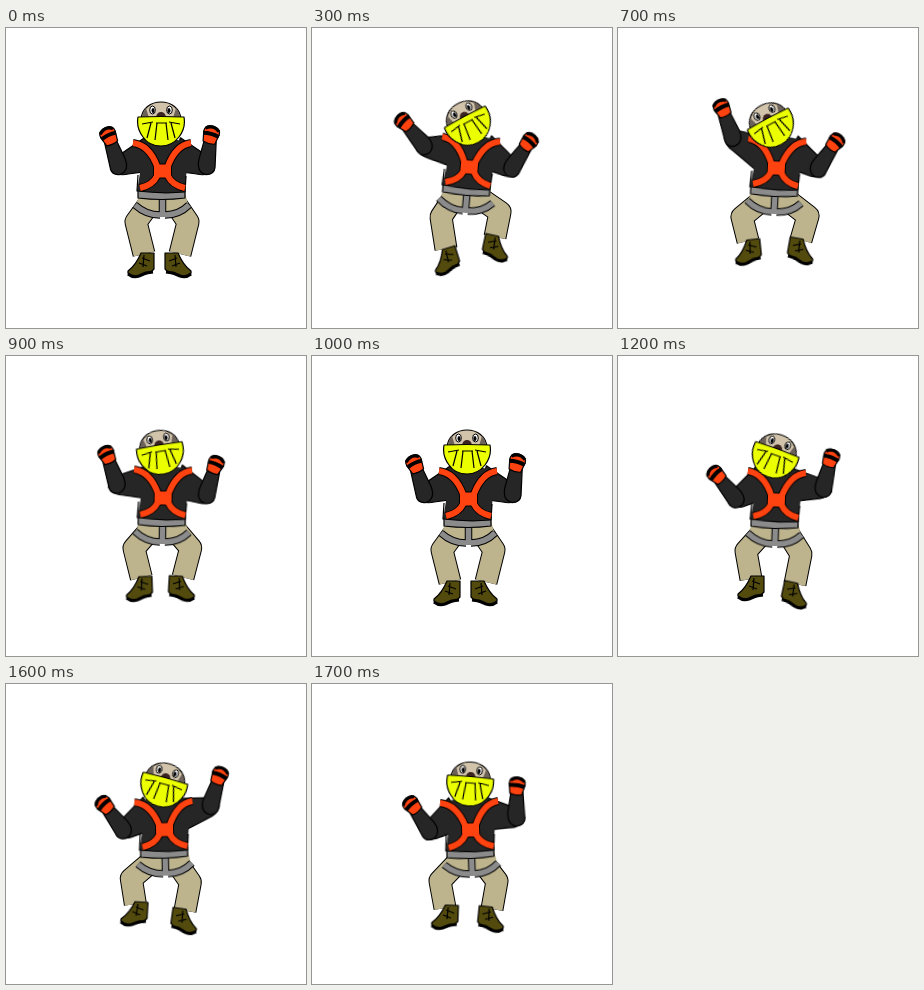
An HTML page without scripts for the animation above (1800 ms loop, 300 by 300 pixels).

```html
<!DOCTYPE html>
<html lang="en">
<head>
<meta charset="utf-8">
<title>Climber</title>
<style>
html, body { margin: 0; width: 100%; height: 100%; overflow: hidden; background: #fff; }
svg { display: block; width: 100vw; height: 100vh; }
path { fill: none; stroke-linejoin: round; }

.line { stroke: #000; stroke-width: 1.2; }
.black { fill: #262626; }
.beige { fill: #bdb48e; }
.orange { fill: #ff4310; }
.grey { fill: #8b8b8b; }

/* Bands: a black stroke under a narrower coloured one */
.trouser { stroke: #bdb48e; stroke-width: 21; }
.trouser.edge { stroke: #000; stroke-width: 23; }
.strap { stroke: #ff4310; stroke-width: 6; }
.strap.edge { stroke: #000; stroke-width: 8; }
.loop { stroke: #8b8b8b; stroke-width: 5.5; }
.loop.edge { stroke: #000; stroke-width: 7.5; }

/* Every pose is held for 100 ms; steps(n) fills n holds up to the next key */
.arm-l, .arm-r, .fore-l, .fore-r, .leg-l, .leg-r, .boot-l, .boot-r, .body, .head {
  animation: 1.8s steps(3) infinite;
}
.arm-l { animation-name: arm-l; }
.arm-r { animation-name: arm-r; }
.fore-l { animation-name: fore-l; }
.fore-r { animation-name: fore-r; }
.leg-l { animation-name: leg-l; }
.leg-r { animation-name: leg-r; }
.boot-l { animation-name: boot-l; }
.boot-r { animation-name: boot-r; }
.body { animation-name: body; transform-origin: 156px 140px; }
.head { animation-name: head; }

@keyframes arm-l {
  0%, 100% { rotate: -25deg; }
  16.66% { rotate: -2deg; animation-timing-function: steps(2); }
  27.77% { rotate: 24deg; animation-timing-function: steps(2); }
  38.88% { rotate: 20deg; }
  55.55% { rotate: -25deg; animation-timing-function: steps(2); }
  66.66% { rotate: -38deg; animation-timing-function: steps(2); }
  77.77% { rotate: -34deg; }
  94.44% { rotate: -36deg; animation-timing-function: steps(1); }
}
@keyframes fore-l {
  0%, 100% { rotate: 8deg; }
  16.66% { rotate: -42deg; animation-timing-function: steps(2); }
  27.77% { rotate: -68deg; animation-timing-function: steps(2); }
  38.88% { rotate: -42deg; }
  55.55% { rotate: 8deg; animation-timing-function: steps(2); }
  66.66% { rotate: -2deg; animation-timing-function: steps(2); }
  77.77% { rotate: -7deg; }
  94.44% { rotate: 5deg; animation-timing-function: steps(1); }
}
@keyframes arm-r {
  0%, 100% { rotate: -25deg; }
  16.66% { rotate: -31deg; animation-timing-function: steps(4); }
  38.88% { rotate: -33deg; }
  55.55% { rotate: -25deg; animation-timing-function: steps(2); }
  66.66% { rotate: -9deg; animation-timing-function: steps(2); }
  77.77% { rotate: 19deg; animation-timing-function: steps(1); }
  83.33% { rotate: 32deg; animation-timing-function: steps(2); }
  94.44% { rotate: -13deg; animation-timing-function: steps(1); }
}
@keyframes fore-r {
  0%, 100% { rotate: 18deg; }
  16.66%, 38.88% { rotate: 4deg; }
  16.66% { animation-timing-function: steps(4); }
  55.55% { rotate: 18deg; animation-timing-function: steps(2); }
  66.66% { rotate: -2deg; animation-timing-function: steps(2); }
  77.77% { rotate: -40deg; animation-timing-function: steps(1); }
  83.33% { rotate: -64deg; animation-timing-function: steps(2); }
  94.44% { rotate: 11deg; animation-timing-function: steps(1); }
}
@keyframes leg-l {
  0%, 100% { d: path("M146 172L130 194L138 226"); }
  16.66% { d: path("M143 168L129 189L134 221"); animation-timing-function: steps(4); }
  38.88% { d: path("M147 170L124 189L130 213"); }
  55.55% { d: path("M146 172L130 194L138 226"); animation-timing-function: steps(2); }
  66.66% { d: path("M147 174L128 195L133 223"); animation-timing-function: steps(2); }
  77.77% { d: path("M147 175L120 190L122 212"); }
  94.44% { d: path("M147 177L128 197L133 224"); animation-timing-function: steps(1); }
}
@keyframes leg-r {
  0%, 100% { d: path("M167 172L182 194L174 226"); }
  16.66% { d: path("M169 171L188 184L183 209"); animation-timing-function: steps(2); }
  27.77% { d: path("M169 170L191 182L185 204"); animation-timing-function: steps(2); }
  38.88% { d: path("M168 171L190 188L183 212"); }
  55.55% { d: path("M167 172L182 194L174 226"); animation-timing-function: steps(2); }
  66.66% { d: path("M168 174L183 198L177 228"); animation-timing-function: steps(2); }
  77.77% { d: path("M168 175L183 201L177 230"); }
  94.44% { d: path("M169 176L185 197L180 225"); animation-timing-function: steps(1); }
}
@keyframes boot-l {
  0%, 100% { transform: translate(135px, 237px) rotate(0deg); }
  16.66% { transform: translate(134px, 233px) rotate(-17deg); animation-timing-function: steps(4); }
  38.88% { transform: translate(130px, 224px) rotate(-6deg); }
  55.55% { transform: translate(135px, 237px) rotate(0deg); animation-timing-function: steps(2); }
  66.66% { transform: translate(133px, 232px) rotate(0deg); animation-timing-function: steps(2); }
  77.77% { transform: translate(119px, 223px) rotate(6deg); }
  94.44% { transform: translate(133px, 233px) rotate(2deg); animation-timing-function: steps(1); }
}
@keyframes boot-r {
  0%, 100% { transform: translate(172px, 237px) rotate(0deg); }
  16.66% { transform: translate(184px, 220px) rotate(12deg); animation-timing-function: steps(2); }
  27.77% { transform: translate(186px, 214px) rotate(14deg); animation-timing-function: steps(2); }
  38.88% { transform: translate(183px, 223px) rotate(10deg); }
  55.55% { transform: translate(172px, 237px) rotate(0deg); animation-timing-function: steps(2); }
  66.66% { transform: translate(177px, 239px) rotate(12deg); animation-timing-function: steps(2); }
  77.77% { transform: translate(177px, 241px) rotate(12deg); }
  94.44% { transform: translate(179px, 235px) rotate(6deg); animation-timing-function: steps(1); }
}
@keyframes body {
  0%, 100% { transform: translate(0, 0) rotate(0deg); }
  16.66% { transform: translate(1px, -4px) rotate(5deg); animation-timing-function: steps(2); }
  27.77% { transform: translate(2px, -5px) rotate(6deg); animation-timing-function: steps(2); }
  38.88% { transform: translate(2px, -3px) rotate(3deg); }
  55.55% { transform: translate(0, 0) rotate(0deg); animation-timing-function: steps(2); }
  66.66% { transform: translate(2px, 1px) rotate(2deg); animation-timing-function: steps(2); }
  77.77% { transform: translate(2px, 2px) rotate(0deg); }
  94.44% { transform: translate(2px, 3px) rotate(-2deg); animation-timing-function: steps(1); }
}
@keyframes head {
  0%, 100% { transform: translate(155px, 96px) rotate(0deg); }
  16.66% { transform: translate(156px, 95px) rotate(-28deg); animation-timing-function: steps(2); }
  27.77% { transform: translate(154px, 95px) rotate(-38deg); animation-timing-function: steps(2); }
  38.88% { transform: translate(153px, 97px) rotate(-28deg); }
  55.55% { transform: translate(155px, 96px) rotate(0deg); animation-timing-function: steps(2); }
  66.66% { transform: translate(157px, 100px) rotate(20deg); animation-timing-function: steps(2); }
  77.77% { transform: translate(157px, 103px) rotate(36deg); }
  94.44% { transform: translate(158px, 100px) rotate(5deg); animation-timing-function: steps(1); }
}
</style>
</head>
<body>
<svg viewBox="0 0 300 300">
  <defs>
    <g id="boot">
      <path class="line" style="fill:#534a0e" d="M0-12L13-12L13 4L9 8L-3 11Q-14 12-13 6Q-5 0 0-12Z"/>
      <path style="stroke:#000;stroke-width:3" d="M-13 9Q-8 13-2 11L5 8L12 7"/>
      <path class="line" d="M1-7L9-4M-2-2L6 1M3-10L2 2"/>
    </g>
    <path id="upper" class="line black" d="M6-14L-25-9Q-38-6-38 2Q-34 10-24 12L2 20Z"/>
    <g id="fore">
      <path class="line black" d="M-8 1L-6-25H6L9-5Q10 8 0 9Q-8 8-8 1Z"/>
      <g transform="translate(0 -31) rotate(-8)">
        <path class="line orange" d="M-6 8L-8-2Q-8-9 0-9Q8-9 8-2L6 8Q0 10-6 8Z"/>
        <path style="stroke:#000;stroke-width:4" d="M-8 0Q0-2 8 0"/>
        <path style="stroke:#000;stroke-width:3" d="M-7-5Q0-11 7-5"/>
      </g>
    </g>
    <path id="loops" d="M129 177Q140 187 154 187M183 177Q173 187 159 187M156.500 169V189"/>
    <path id="straps" d="M127 115Q143 117 151 138V148Q147 157 134 160M185 115Q170 117 162 138V148Q166 157 179 160"/>
  </defs>

  <path class="leg-l trouser edge"/>
  <path class="leg-r trouser edge"/>
  <path class="leg-l trouser"/>
  <path class="leg-r trouser"/>
  <g class="boot-l"><use href="#boot"/></g>
  <g class="boot-r"><use href="#boot" transform="scale(-1 1)"/></g>

  <g class="body">
    <path class="beige" d="M134 164H179L182 177Q172 192 156 187Q141 192 130 177Z"/>
    <g class="loop edge"><use href="#loops"/></g>
    <g class="loop"><use href="#loops"/></g>
    <path class="line grey" d="M132 161H179V170Q156 173 132 170Z"/>

    <g transform="translate(139 125)">
      <g class="arm-l">
        <use href="#upper"/>
        <g transform="translate(-30 0)"><g class="fore-l"><use href="#fore"/></g></g>
      </g>
    </g>
    <g transform="translate(174 125) scale(-1 1)">
      <g class="arm-r">
        <use href="#upper"/>
        <g transform="translate(-30 0)"><g class="fore-r"><use href="#fore"/></g></g>
      </g>
    </g>

    <path class="black" d="M130 114Q156 108 183 114L180 150L178 164Q156 166 131 163L134 145Z"/>
    <path class="line" d="M132 147L131 163Q156 166 179 164L180 148"/>
    <g class="strap edge"><use href="#straps"/></g>
    <path class="line orange" d="M150 136H163V150H150Z"/>
    <g class="strap"><use href="#straps"/></g>
  </g>

  <g class="head">
    <path class="line" style="fill:#d2c4ab" d="M-20-4C-19-28 19-28 20-4Z"/>
    <path style="fill:#6d6259" d="M-19-5Q-19-12-15-16L-12-6ZM19-5Q19-12 15-16L12-6Z"/>
    <path style="fill:#3b2320" d="M-5-7Q-4-12 0-12Q4-12 5-7Z"/>
    <g fill="#fff" stroke="#000">
      <ellipse cx="-8.500" cy="-14" rx="2.800" ry="4"/>
      <ellipse cx="8.500" cy="-14" rx="2.800" ry="4"/>
    </g>
    <ellipse cx="-8" cy="-13.500" rx="1.500" ry="2.500"/>
    <ellipse cx="8" cy="-13.500" rx="1.500" ry="2.500"/>
    <path class="line" style="fill:#ecff00" d="M-23-7Q0-8 23-7Q25 4 18 13Q11 22 0 22Q-12 22-18 13Q-25 4-23-7Z"/>
    <path class="line" d="M-19 0L-8-2M-10-1L-14 14M-5-1H6M-4-1L-6 16M5-1L7 16M8-2L19 0M10-1L14 14"/>
  </g>
</svg>
</body>
</html>
```
